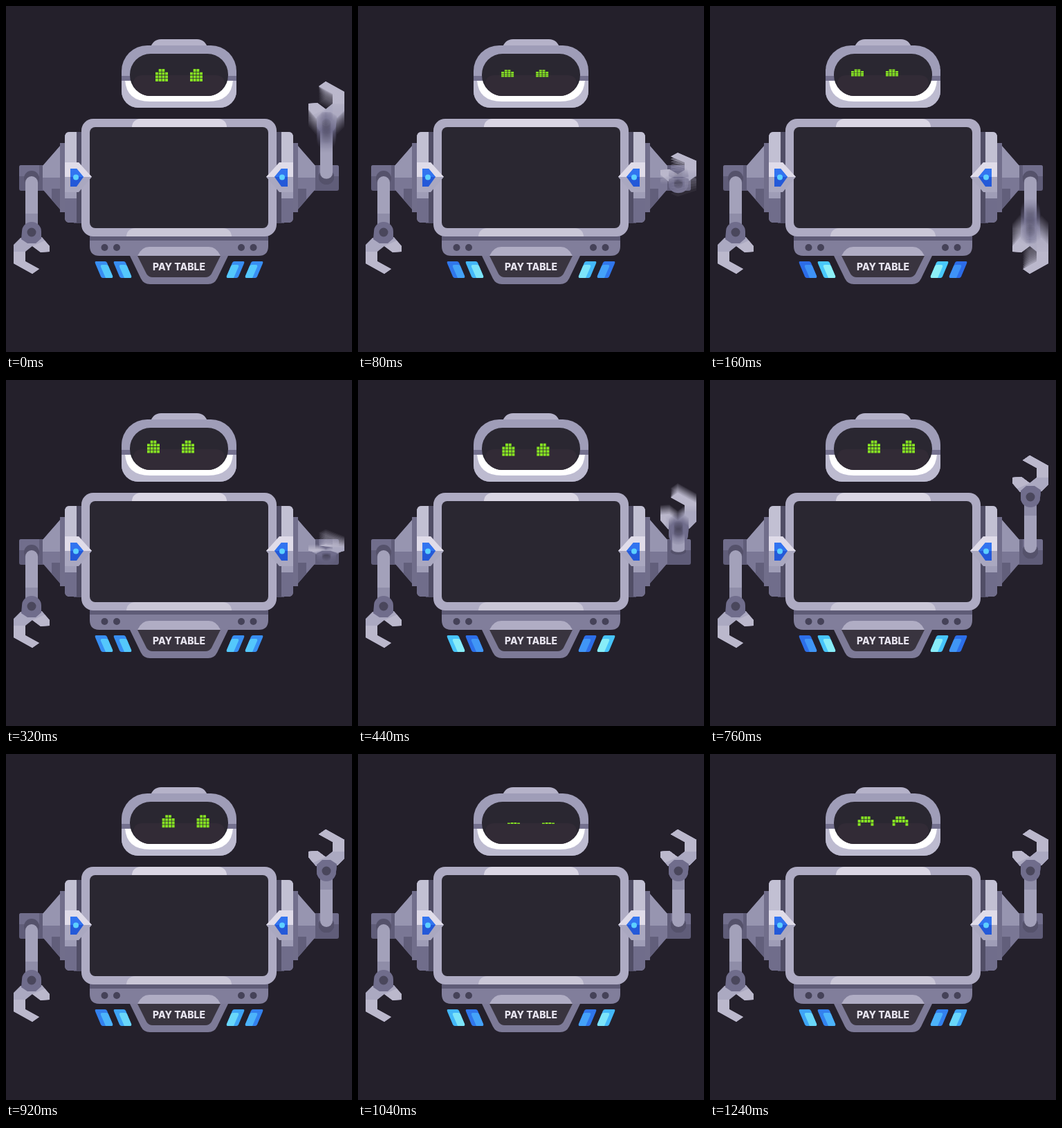
An HTML page that plays this animation: 500x500 px, repeating every 1.28 s.

```html
<!DOCTYPE html>
<html lang="en">
<head>
<meta charset="utf-8">
<title>Robot</title>
<style>
html, body { margin: 0; width: 100%; height: 100%; overflow: hidden; background: #24202b; }
svg { display: block; width: 100%; height: 100%; }
text { font: 800 14px Inter, "Open Sans", sans-serif; fill: #e8e5f0; text-anchor: middle; }
</style>
</head>
<body>
<svg viewBox="0 0 500 500">
  <defs>
    <clipPath id="headClip"><path d="M167 94A37 37 0 0 1 204 57H296A37 37 0 0 1 333 94V123A24 24 0 0 1 309 147H191A24 24 0 0 1 167 123Z"/></clipPath>
    <clipPath id="frameClip"><rect x="109" y="163" width="282" height="170" rx="17"/></clipPath>

    <g id="forearm">
      <circle cx="37" cy="249" r="11" fill="#55526b"/>
      <path d="M28 255a9 9 0 0 1 18 0V322H28Z" fill="#a3a1ba"/>
      <path d="M28 300H46V322H28Z" fill="#8f8da8"/>
    </g>
    <g id="claw">
      <path d="M21 335L11 345V372L38 387L48 380L28 369V355L38 347L50 356L63 355V347L52 334Z" fill="#aba9c1"/>
      <path d="M11 345V372L38 387L48 380L28 369V355H11Z" fill="#bbb8cc"/>
      <path d="M38 347L50 356L63 355V347L56 339Z" fill="#bbb8cc"/>
      <path d="M23 326a14 14 0 0 1 28 0V336L43 343H31L22 337Z" fill="#706d8c"/>
      <circle cx="37" cy="327" r="6.500" fill="#4a475c"/>
    </g>

    <g id="shoulder">
      <path d="M22 230H56V267H22Q19 267 19 264V233Q19 230 22 230Z" fill="#605d79"/>
      <path d="M19 246V233Q19 230 22 230H48V246Z" fill="#716e8c"/>
      <path d="M53 231L80 200V296L53 265Z" fill="#7a7795"/>
      <path d="M53 231L80 200V248H53Z" fill="#9795b0"/>
      <path d="M66 264H80V296L66 280Z" fill="#625f7b"/>
      <path d="M78 198H86V298H78Z" fill="#716e8b"/>
      <path d="M109 182H98V314H109Z" fill="#514e66"/>
      <path d="M102 182H92Q85 182 85 190V305Q85 313 92 313H102Z" fill="#9f9db7"/>
      <path d="M102 182H92Q85 182 85 190V234H102Z" fill="#c2c0d3"/>
      <path d="M102 278H85V305Q85 313 92 313H102Z" fill="#706d8b"/>
    </g>

    <g id="gem">
      <path d="M85 226H105L124 247L105 269H85Z" fill="#aaa8c0"/>
      <path d="M85 226H105L124 247H85Z" fill="#e0dce9"/>
      <path d="M93 235H102L112 247L102 261H93Z" fill="#2459d8"/>
      <path d="M93 235H102L112 247H93Z" fill="#3274f0"/>
      <circle cx="101" cy="247.500" r="4" fill="#5cd0ff"/>
    </g>

    <g id="bolts" fill="#454258">
      <circle cx="142.500" cy="349" r="5"/><circle cx="160" cy="349" r="5"/>
    </g>
  </defs>

  <rect width="500" height="500" fill="#24202b"/>

  <!-- head -->
  <path d="M208 62Q212 48 224 48H276Q288 48 292 62Z" fill="#b5b2c9"/>
  <g clip-path="url(#headClip)">
    <rect x="167" y="57" width="166" height="90" fill="#9f9db8"/>
    <rect x="167" y="107" width="166" height="40" fill="#bdbbd0"/>
    <path d="M172 107H328Q326 138 292 138H208Q174 138 172 107Z" fill="#fff"/>
    <rect x="167" y="101" width="166" height="7" fill="#74718f"/>
  </g>
  <rect x="179" y="69" width="142" height="61" rx="30" fill="#2a2731"/>
  <path d="M184 113Q184 100 198 100H302Q316 100 316 113Q309 130 291 130H209Q191 130 184 113Z" fill="#322b36"/>
  <g id="eyes" fill="#86e323"></g>

  <!-- arms and shoulders -->
  <use href="#shoulder"/>
  <use href="#shoulder" transform="matrix(-1 0 0 1 500 0)"/>
  <use href="#forearm"/>
  <use href="#claw"/>
  <g id="wave" transform="matrix(-1 0 0 1 500 0)"></g>

  <!-- body -->
  <path d="M121 326H379V347Q379 361 365 361H135Q121 361 121 347Z" fill="#817e9b"/>
  <rect x="121" y="326" width="258" height="13" fill="#5f5c77"/>
  <path d="M190 361Q196 348 207 348H293Q304 348 310 361Z" fill="#b0adc4"/>
  <use href="#bolts"/>
  <use href="#bolts" transform="matrix(-1 0 0 1 500 0)"/>
  <g clip-path="url(#frameClip)">
    <rect x="109" y="163" width="282" height="170" fill="#aeabc3"/>
    <rect x="182" y="163" width="137" height="24" rx="12" fill="#dad6e4"/>
    <rect x="174" y="321" width="152" height="24" rx="12" fill="#cac7d7"/>
  </g>
  <rect x="121" y="175" width="258" height="146" rx="8" fill="#2a2731"/>
  <use href="#gem"/>
  <use href="#gem" transform="matrix(-1 0 0 1 500 0)"/>

  <path d="M179 361H321L305 394Q301 402 292 402H208Q199 402 195 394Z" fill="#7d7a97"/>
  <path d="M190 361H310L297 387Q294 392 288 392H212Q206 392 203 387Z" fill="#39343f"/>
  <text x="250" y="381.500">PAY TABLE</text>
  <g id="lamps"></g>
</svg>
<script>
const LOOP = 1280, STEP = 40, SHUTTER = 30, COPIES = 14;
const AXIS = 248, TIP = 139, CLAW = 60;
const $ = id => document.getElementById(id);
const clamp = (x, lo = 0, hi = 1) => Math.min(hi, Math.max(lo, x));
const ramp = (t, a, b) => clamp((t - a) / (b - a));
const ease = u => u * u * (3 - 2 * u);
const mix = (a, b, u) => a + (b - a) * u;

function add(parent, tag, attrs) {
  const el = document.createElementNS("http://www.w3.org/2000/svg", tag);
  for (const k in attrs) el.setAttribute(k, attrs[k]);
  parent.appendChild(el);
  return el;
}

// Stacked copies whose opacities average evenly give the motion blur.
const copies = Array.from({ length: COPIES }, (_, i) => {
  const g = add($("wave"), "g", { opacity: 1 / (i + 1) });
  return { forearm: add(g, "use", { href: "#forearm" }), claw: add(g, "use", { href: "#claw" }) };
});

function dots(rows) {
  const pitch = 4.7;
  let d = "";
  rows.forEach((row, y) => [...row].forEach((c, x) => {
    if (c === "#") d += `M${(x - row.length / 2) * pitch + .4} ${(y - rows.length / 2) * pitch + .4}h3.9v3.9h-3.9z`;
  }));
  return d;
}
const roundEye = dots([" ## ", "####", "####", "####"]);
const happyEye = dots([" ### ", "#####", "#   #"]);
const eyes = [0, 50].map(dx => ({ dx, el: add($("eyes"), "path", {}) }));

const lamps = [[128, 1], [155, 1], [372, -1], [345, -1]].map(([x, dir], i) => {
  const g = add($("lamps"), "g", { transform: `translate(${x} 369) scale(${dir} 1)` });
  return {
    edge: add(g, "path", { d: "M2 0H15Q17 0 18 2L26 21Q27 24 24 24H12Q10 24 9 22L1 3Q0 0 2 0Z" }),
    core: add(g, "path", { d: "M11 5H17Q19 5 20 7L26 21Q27 24 24 24H16L9 8Q8 5 11 5Z" }),
    sign: i % 2 ? 1 : -1
  };
});

// 1 is raised, -1 is lowered.
function lift(t) {
  if (t < 160) return 1 - 2 * Math.pow(clamp(t / 155), 1.5);
  return 1 - 2 * Math.pow(1 - ramp(t, 160, 660), 2);
}

// The claw keeps its size while the forearm shortens, and flips near the elbow.
function poseArm({ forearm, claw }, s) {
  const flip = clamp(3 * s, -1, 1);
  const reach = (TIP * s - CLAW * flip) / (TIP - CLAW);
  forearm.setAttribute("transform", `translate(0 ${AXIS}) scale(1 ${reach}) translate(0 ${-AXIS})`);
  claw.setAttribute("transform", `translate(0 ${AXIS + TIP * s}) scale(1 ${flip}) translate(0 ${-AXIS - TIP})`);
}

function eyePos(t) {
  const left = ease(ramp(t, 0, 120)), over = ease(ramp(t, 380, 600)), back = ease(ramp(t, 880, 1020));
  const x = 225 - 12 * left + 24 * over - 12 * back;
  const y = 100 - 3.5 * left + 8 * Math.sin(Math.PI * over) + 3.5 * back;
  return [x, y];
}

function blink(t, mid, half) {
  return mix(.12, 1, clamp(Math.abs(t - mid) / half));
}

function shade(v, dark, midTone, light) {
  const [a, b, u] = v < 0 ? [dark, midTone, v + 1] : [midTone, light, v];
  return `rgb(${a.map((c, i) => Math.round(mix(c, b[i], u)))})`;
}

function draw(now) {
  const t = Math.floor(now % LOOP / STEP) * STEP;

  copies.forEach((arm, i) => poseArm(arm, -lift(t + SHUTTER * i / (COPIES - 1))));

  const happy = t > 1040;
  let [x, y] = eyePos(t);
  if (happy) y -= 3 + 4 * Math.sin(Math.PI * ramp(t, 1100, 1240));
  const open = blink(t, 120, 80) * blink(t, 1040, 80);
  for (const { dx, el } of eyes) {
    el.setAttribute("d", happy ? happyEye : roundEye);
    el.setAttribute("transform", `translate(${x + dx} ${y}) scale(1 ${open})`);
  }

  const glow = Math.sin(2 * Math.PI * t / 640);
  for (const { edge, core, sign } of lamps) {
    edge.setAttribute("fill", shade(glow * sign, [44, 108, 232], [56, 142, 242], [72, 200, 252]));
    core.setAttribute("fill", shade(glow * sign, [62, 146, 246], [84, 200, 252], [140, 240, 248]));
  }
}

const start = performance.now();
function tick() {
  draw(performance.now() - start);
  requestAnimationFrame(tick);
}
tick();
</script>
</body>
</html>
```
